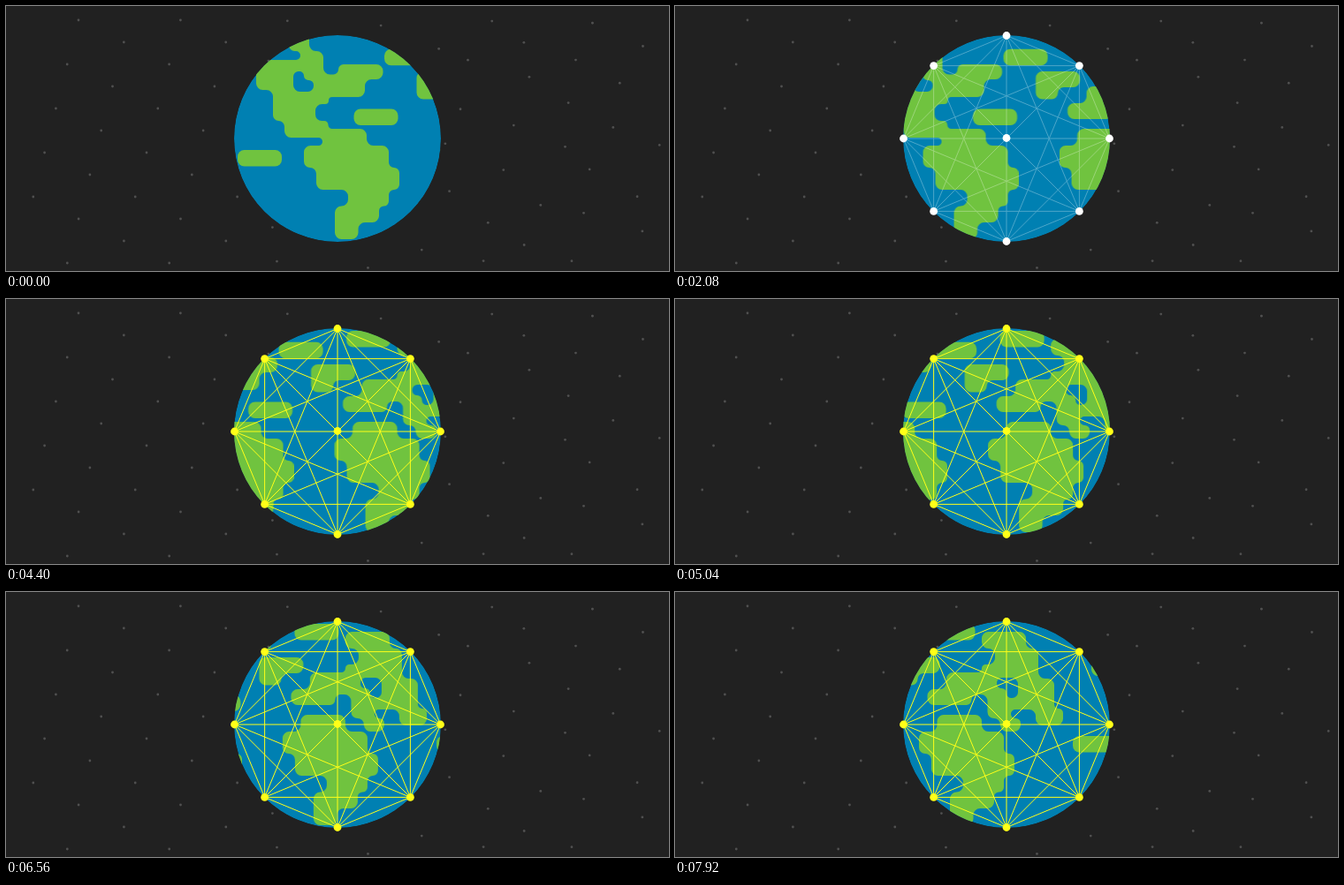
An HTML page that plays this animation: 750x300 px, repeating every 8 s.

```html
<!DOCTYPE html>
<html lang="en">
<head>
<meta charset="utf-8">
<title>Connected globe</title>
<style>
  html, body { margin: 0; width: 100%; height: 100%; overflow: hidden; background: #212121; }
  svg { display: block; width: 750px; height: 300px; }
  #stars { fill: #505050; }
  .sea { fill: #0080b2; }
  #land { fill: #70c33f; animation: turn 8s linear infinite; }
  #net { color: #fff; animation: tint 8s linear infinite; }
  #lines { stroke: currentColor; animation: reveal 8s linear infinite; }
  #nodes { fill: currentColor; }
  #nodes circle { transform-box: fill-box; transform-origin: center; }
  @keyframes turn { to { transform: translateX(-217.2px); } }
  @keyframes tint {
    0%, 31% { color: #fff; }
    37.5%, 100% { color: #ffff18; }
  }
  @keyframes reveal {
    0%, 22% { opacity: 0; }
    26% { opacity: .3; }
    37.5%, 100% { opacity: 1; }
  }
</style>
</head>
<body>
<svg viewBox="0 0 750 300">
  <clipPath id="disc"><circle cx="375" cy="150" r="117"/></clipPath>
  <g id="stars"></g>
  <g clip-path="url(#disc)">
    <circle class="sea" cx="375" cy="150" r="117"/>
    <g id="land">
      <g id="world"></g>
      <use href="#world" x="403"/>
    </g>
  </g>
  <g id="net">
    <g id="lines"></g>
    <g id="nodes"></g>
  </g>
</svg>
<script>
const LOOP = 8000, CX = 375, CY = 150;

function add(parent, tag, attrs) {
  const el = document.createElementNS('http://www.w3.org/2000/svg', tag);
  for (const k in attrs) el.setAttribute(k, attrs[k]);
  return document.getElementById(parent).appendChild(el);
}

// Right-angled outline with rounded corners; steps alternate x, y, x, y...
function blob(steps, attrs) {
  const n = steps.length;
  const pts = steps.map((v, i) => {
    const w = steps[(i + 1) % n];
    return i % 2 ? [w, v] : [v, w];
  });
  const d = pts.map((p, i) => {
    const a = pts[(i + n - 1) % n], b = pts[(i + 1) % n];
    const la = Math.hypot(a[0] - p[0], a[1] - p[1]);
    const lb = Math.hypot(b[0] - p[0], b[1] - p[1]);
    const r = Math.min(7.5, la / 2, lb / 2);
    const toward = (q, len) => [0, 1].map(k => p[k] + (q[k] - p[k]) * r / len);
    const turn = (p[0] - a[0]) * (b[1] - p[1]) - (p[1] - a[1]) * (b[0] - p[0]);
    return `${i ? 'L' : 'M'}${toward(a, la)}A${r} ${r} 0 0 ${turn > 0 ? 1 : 0} ${toward(b, lb)}`;
  }).join('') + 'Z';
  add('world', 'path', { d, ...attrs });
}

const slab = (x, y, w = 50, h = 18.4) =>
  add('world', 'rect', { x, y, width: w, height: h, rx: 7.5 });

// The southern coast is shared by both continents
const south = [408, 158, 433, 183, 445, 208, 433, 226.5, 422, 245, 398.5, 264,
  372, 226.5, 387, 208, 351, 183, 337, 158];

blob([320, 20, 343, 51, 359, 77.5, 376, 66, 426.5, 83, 406, 103, 365, 111,
  350, 130, 364.5, 139, ...south, 358, 149, 315, 130, 302, 95, 283, 61, 333, 51]);
blob([357.5, 139, ...south], { transform: 'translate(154)' });
blob([562, 45, 612, 64, 626, 98, 644, 132, 654, 151, 623, 133, 595, 143, 606, 158,
  583, 143, 568.5, 116, 550.5, 128, 500.5, 110, 522, 91, 562, 82, 577, 64]);

blob([325, 74, 337, 84, 348, 97], { class: 'sea' });
blob([579, 97, 603, 120, 590, 109], { class: 'sea' });

blob([464.5, 74, 514.5, 92, 489.5, 105.5]);
slab(428, 48.8);
slab(504.5, 36);
slab(393.5, 116.5);
slab(262, 163);

// Slanted lattice of stars that loosens towards the right
let seed = 7;
const rand = () => (seed = seed * 16807 % 2147483647) / 2147483647 - .5;
const GAP = 115.4;
for (let row = 0; row < 12; row++) {
  const first = (82 + 51.3 * row) % GAP;
  for (let x = first; x < 750; x += GAP) {
    const loose = x > 270 ? 24 : 0;
    const cx = x + rand() * loose, cy = 16 + 25 * row + rand() * loose;
    if (cx > 26) add('stars', 'circle', { cx, cy, r: 1.4 });
  }
}

// Eight nodes clockwise from the top, each linked to all the others
const ring = Array.from({ length: 8 }, (_, i) => {
  const a = i * Math.PI / 4;
  return [CX + 116.5 * Math.sin(a), CY - 116.5 * Math.cos(a)];
});

ring.forEach(([x1, y1], i) => {
  for (const [x2, y2] of ring.slice(i + 1)) add('lines', 'line', { x1, y1, x2, y2 });
});

[...ring, [CX, CY - .5]].forEach(([cx, cy], i) => {
  const start = 60 + i * 165;
  const hidden = { opacity: 0, transform: 'scale(0)' };
  const shown = { opacity: 1, transform: 'scale(1)' };
  add('nodes', 'circle', { cx, cy, r: 4.4 }).animate([
    { ...hidden, offset: 0 },
    { ...hidden, offset: start / LOOP },
    { ...shown, offset: (start + 150) / LOOP },
    { ...shown, offset: 1 }
  ], { duration: LOOP, iterations: Infinity });
});
</script>
</body>
</html>
```
